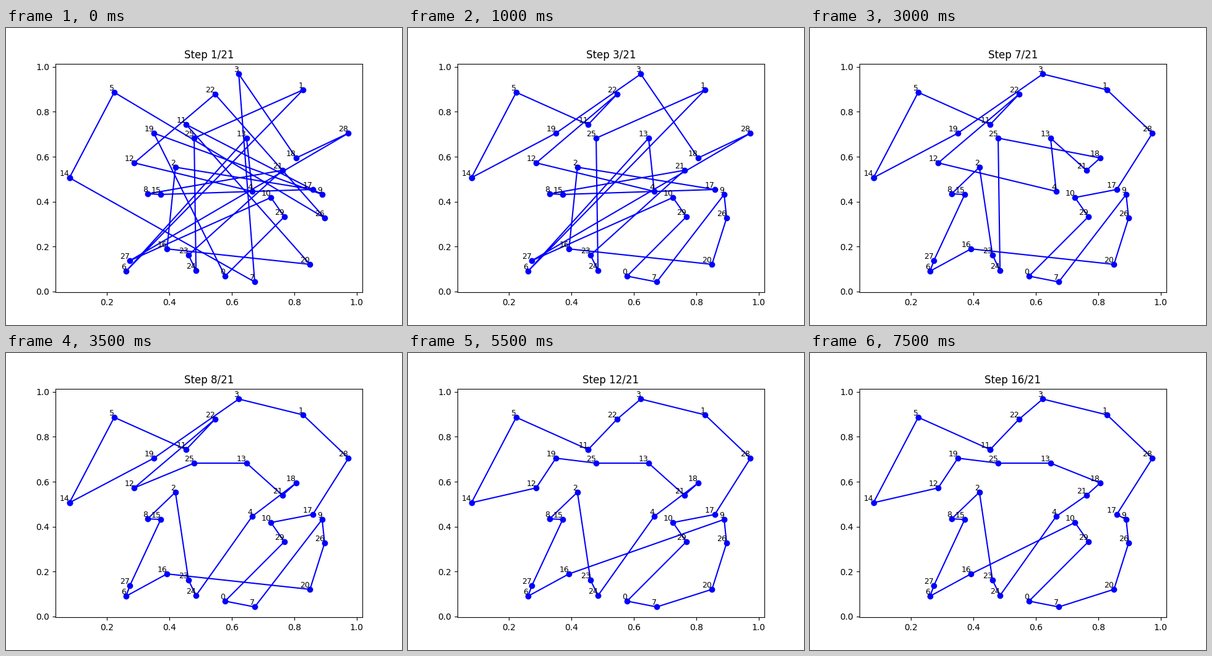
These frames come from a looping animation (640x480 px, 8000 ms). A matplotlib script:

```python
from itertools import combinations

import numpy as np
import matplotlib.pyplot as plt
from matplotlib.animation import FuncAnimation

FRAMES, STEPS = 16, 21

# City positions, listed in the order of the first tour.
cities = {
    14: (0.0796, 0.5065), 7: (0.673, 0.0426), 3: (0.622, 0.9682), 18: (0.806, 0.5947),
    28: (0.9733, 0.7049), 27: (0.273, 0.1374), 10: (0.725, 0.4184), 29: (0.768, 0.3330),
    0: (0.578, 0.0685), 19: (0.350, 0.7049), 9: (0.889, 0.4321), 11: (0.4535, 0.7434),
    20: (0.850, 0.1209), 16: (0.392, 0.1897), 2: (0.419, 0.5534), 17: (0.859, 0.4542),
    15: (0.372, 0.4321), 8: (0.330, 0.4349), 21: (0.762, 0.5396), 23: (0.461, 0.1622),
    24: (0.485, 0.0933), 25: (0.479, 0.6828), 1: (0.828, 0.8977), 6: (0.261, 0.0906),
    13: (0.647, 0.6828), 4: (0.665, 0.4459), 12: (0.287, 0.5726), 22: (0.546, 0.8784),
    26: (0.897, 0.3275), 5: (0.223, 0.8867),
}


def closed_path(tour):
    return np.array([cities[c] for c in tour + tour[:1]]).T


def length(tour):
    return np.hypot(*np.diff(closed_path(tour))).sum()


def swapped(tour, i, j):
    new = tour.copy()
    new[i], new[j] = new[j], new[i]
    return new


def best_swap(tour):
    pairs = combinations(range(len(tour)), 2)
    return min((swapped(tour, i, j) for i, j in pairs), key=length)


# Steepest descent: every step makes the exchange that shortens the tour most.
tours = [list(cities)]
while len(tours) < FRAMES:
    tours.append(best_swap(tours[-1]))

fig, ax = plt.subplots(figsize=(6.4, 4.8), dpi=100)
line, = ax.plot(*closed_path(tours[0]), "bo-")
for city, (x, y) in cities.items():
    ax.text(x, y, str(city), fontsize=9, ha="right", va="bottom")
title = ax.set_title("")


def update(i):
    line.set_data(*closed_path(tours[i]))
    title.set_text(f"Step {i + 1}/{STEPS}")
    return line, title


anim = FuncAnimation(fig, update, frames=FRAMES, interval=500, repeat=True, repeat_delay=0)
plt.show()
```
